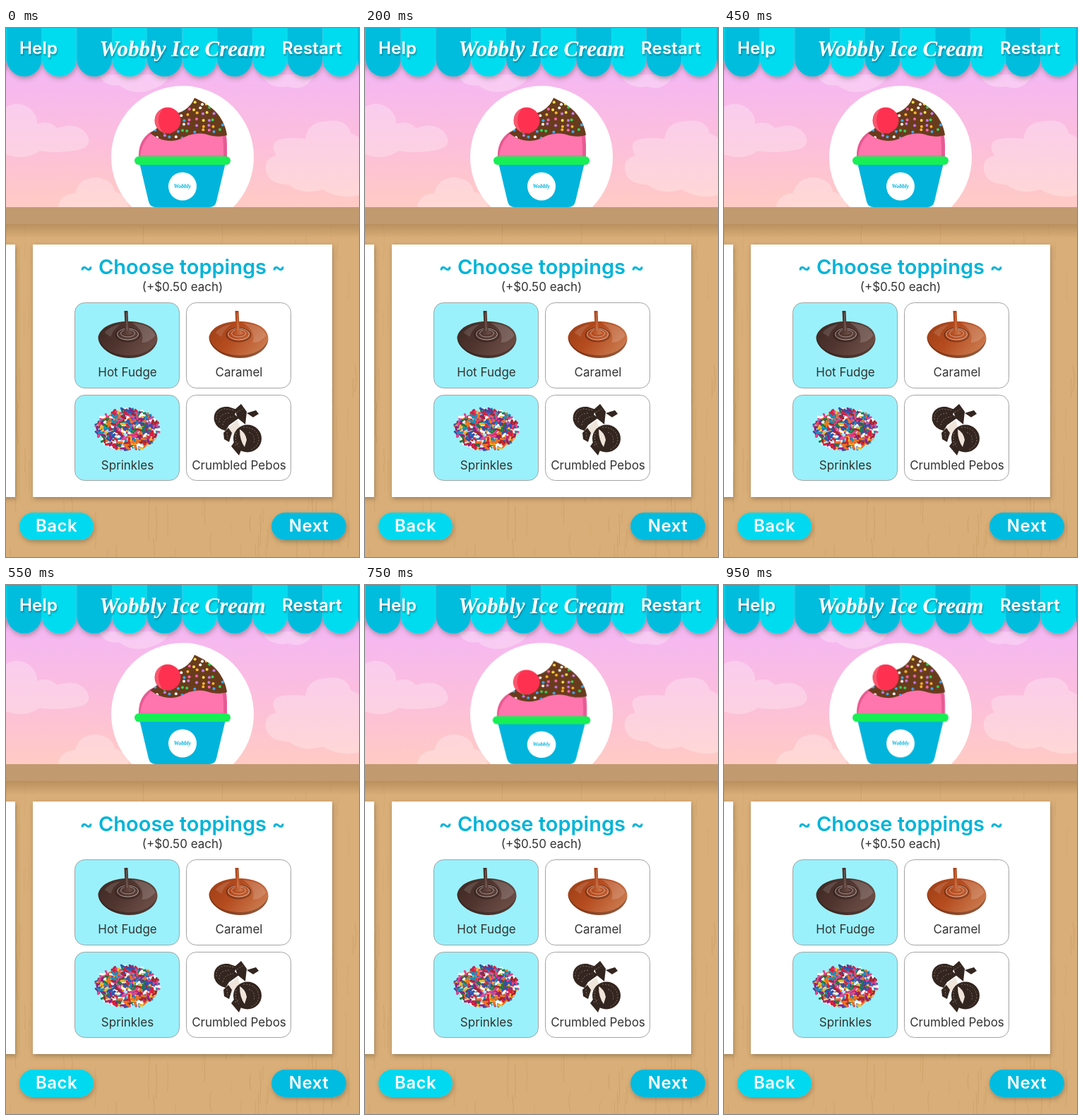
An HTML page that plays this animation: 500x750 px, repeating every 1 s.

```html
<!DOCTYPE html>
<html lang="en">
<head>
<meta charset="utf-8">
<title>Wobbly Ice Cream</title>
<style>
html, body { margin: 0; width: 100%; height: 100%; overflow: hidden; background: #d9ae78; }
svg { display: block; width: 100%; height: 100%; }
text { font-family: Inter, Roboto, sans-serif; }
.nav { font-size: 24px; font-weight: 600; letter-spacing: .2px; fill: #fff; filter: url(#textShadow); }
.brand { font: italic bold 31px "Liberation Serif", serif; fill: #fff; text-anchor: middle; filter: url(#textShadow); }
.heading { font-size: 29px; font-weight: 600; fill: #00b4d8; text-anchor: middle; }
.label { font-size: 17px; fill: #333; text-anchor: middle; }
.button { font-size: 24px; font-weight: 600; letter-spacing: .5px; fill: #fff; text-anchor: middle; }
.tag { font: italic bold 8px "Liberation Serif", serif; fill: #00b4dc; text-anchor: middle; }
.card { fill: #fff; stroke: #a3a3a3; }
.on { fill: #9af1fb; }
.sundae { transform-origin: 250px 254px; animation: wobble 1s infinite; }
@keyframes wobble {
  0%, 60% { transform: none; animation-timing-function: steps(1); }
  65% { transform: scale(.985, 1.003); animation-timing-function: steps(2); }
  75% { transform: scale(1.018, .945); animation-timing-function: steps(2); }
  85% { transform: scale(.993, 1.008); animation-timing-function: steps(2); }
  95%, 100% { transform: none; }
}
</style>
</head>
<body>
<svg viewBox="0 0 500 750" preserveAspectRatio="none">
  <defs>
    <linearGradient id="sky" x2="0" y2="1">
      <stop offset=".25" stop-color="#f5b7f3"/>
      <stop offset=".65" stop-color="#fcbfdb"/>
      <stop offset="1" stop-color="#ffcbc4"/>
    </linearGradient>
    <linearGradient id="shade" x2="0" y2="1">
      <stop stop-color="#805a30" stop-opacity=".36"/>
      <stop offset="1" stop-color="#805a30" stop-opacity="0"/>
    </linearGradient>
    <linearGradient id="fudge" x2="1" y2=".5">
      <stop stop-color="#3d2722"/>
      <stop offset=".5" stop-color="#50352f"/>
      <stop offset="1" stop-color="#6b4d45"/>
    </linearGradient>
    <linearGradient id="caramel" x2="1" y2=".5">
      <stop stop-color="#9c3d15"/>
      <stop offset=".5" stop-color="#b54c1f"/>
      <stop offset="1" stop-color="#c9774b"/>
    </linearGradient>
    <filter id="textShadow" x="-10%" y="-20%" width="120%" height="150%">
      <feDropShadow dx="1" dy="2" stdDeviation="1" flood-color="#045" flood-opacity=".5"/>
    </filter>
    <filter id="drop" x="-10%" y="-10%" width="120%" height="140%">
      <feDropShadow dx="1" dy="3" stdDeviation="3" flood-color="#543" flood-opacity=".4"/>
    </filter>
    <clipPath id="window"><rect width="500" height="254"/></clipPath>
    <path id="sauce" d="M204 149C215 144 228 124 240 121C254 119 263 109 267 99C278 104 291 111 300 122C308 132 312 143 313 152C302 155 294 154 285 151C268 147 258 152 248 157C234 163 218 160 204 149Z"/>
    <clipPath id="sauceClip"><use href="#sauce"/></clipPath>
    <g id="pour">
      <path d="M-42 37C-39 22-19 14 4 15C27 16 42 25 42 40C41 55 23 67 2 67C-21 67-42 53-42 37Z"/>
      <path d="M-42 37C-38 54-20 63 2 63C23 63 38 53 42 40C41 56 23 67 2 67C-21 67-42 53-42 37Z" fill="#000" opacity=".28"/>
      <path d="M6 17Q33 19 39 35Q31 45 20 45Q25 29 6 17Z" fill="#fff" opacity=".16"/>
      <path d="M-33 31Q-25 21-10 19Q-22 27-24 37Z" fill="#fff" opacity=".13"/>
      <g fill="none" stroke="#fff">
        <ellipse cy="34" rx="17" ry="9.500" stroke="#000" opacity=".3" stroke-width="2"/>
        <ellipse cy="33" rx="15" ry="8" opacity=".5"/>
        <ellipse cy="32" rx="10" ry="5" opacity=".45"/>
      </g>
      <path d="M-5 0H0L1 22Q2 29 7 32Q-1 36-9 32Q-4 29-4 22Z"/>
      <path d="M-2 3L-1 28" stroke="#fff" opacity=".25"/>
    </g>
  </defs>

  <g clip-path="url(#window)">
    <rect width="500" height="254" fill="url(#sky)"/>
    <g fill="#fff" opacity=".27">
      <path d="M0 112Q18 102 34 114Q45 124 44 136Q62 130 72 142Q101 132 114 150Q126 170 96 174Q64 178 48 174Q27 189 0 179Z"/>
      <path d="M74 254Q76 236 98 234Q104 211 129 212Q151 215 154 232Q171 236 174 254Z"/>
      <path d="M132 66Q139 84 160 81Q180 97 207 87Q231 78 230 66Z"/>
      <path d="M368 202Q366 184 383 181Q371 161 391 157Q409 155 424 157Q427 133 454 132Q483 128 488 149L500 155V237Q475 244 448 229Q421 238 400 222Q371 221 368 202Z"/>
      <path d="M362 66Q372 87 399 83Q425 91 437 66Z"/>
    </g>
    <circle cx="250" cy="183" r="101" fill="#fff"/>
    <g class="sundae">
      <path d="M188 184C187 164 196 151 210 145L306 135Q313 148 313 166V184Z" fill="#e75b92"/>
      <path d="M190 184C191 165 201 151 214 146L302 135Q309 150 308 184Z" fill="#ff75ad"/>
      <use href="#sauce" fill="#693b1d"/>
      <g id="dots" clip-path="url(#sauceClip)"></g>
      <circle cx="229" cy="131" r="18.500" fill="#ff3151"/>
      <path d="M222 114A18.500 18.500 0 0 0 222 148Q210 131 222 114Z" fill="#f7596f"/>
      <path d="M189 191H311L298 246Q296 254 288 254H212Q204 254 202 246Z" fill="#00b4dc"/>
      <rect x="182" y="182" width="136" height="12" rx="6" fill="#17ef55"/>
      <circle cx="250" cy="224.500" r="20" fill="#fff"/>
      <text class="tag" x="250" y="227">Wobbly</text>
    </g>
  </g>

  <rect y="254" width="500" height="496" fill="#d9ae78"/>
  <g id="grain" fill="none" stroke="#b98a50" opacity=".32"></g>
  <rect y="278" width="500" height="20" fill="url(#shade)"/>
  <rect y="254" width="500" height="24" fill="#c29a70"/>

  <g id="awning" filter="url(#drop)"></g>
  <text class="nav" x="19" y="37">Help</text>
  <text class="brand" x="250" y="40">Wobbly Ice Cream</text>
  <text class="nav" x="391" y="37">Restart</text>

  <g fill="#fff" filter="url(#drop)">
    <rect x="-30" y="307" width="43" height="358"/>
    <rect x="38" y="307" width="424" height="358"/>
  </g>
  <text class="heading" x="250" y="349">~ Choose toppings ~</text>
  <text class="label" x="250" y="373">(+$0.50 each)</text>

  <rect class="card on" x="97.500" y="389.500" width="148" height="121" rx="14"/>
  <rect class="card" x="255.500" y="389.500" width="148" height="121" rx="14"/>
  <rect class="card on" x="97.500" y="520.500" width="148" height="121" rx="14"/>
  <rect class="card" x="255.500" y="520.500" width="148" height="121" rx="14"/>
  <use href="#pour" x="172.500" y="401" fill="url(#fudge)"/>
  <use href="#pour" x="329.500" y="401" fill="url(#caramel)"/>
  <g id="pile" stroke-width="3" stroke-linecap="round"></g>

  <g fill="#33251f">
    <path d="M309 571L328 556L331 565L318 580Z" fill="#efe5da"/>
    <path d="M295 557C293 543 302 536 315 537L327 541L324 548L330 553L316 563L311 571Q298 568 295 557Z"/>
    <path d="M324 541L333 533L341 544L339 562L328 553Z"/>
    <path d="M341 546L354 542L358 547L350 552Z"/>
    <path d="M308 574L315 567L320 574L316 587L309 583Z"/>
    <ellipse cx="342" cy="582" rx="20" ry="19.500"/>
    <path d="M331 569Q339 573 341 584L338 594Q331 585 331 569Z" fill="#efe5da"/>
    <path d="M319 593L329 579L335 594L330 606Z"/>
    <g fill="none" stroke="#806e63" stroke-dasharray="2 2">
      <path d="M298 555Q297 543 309 540L324 542M302 559Q301 546 318 546M307 563Q309 552 322 551M327 545L335 540M313 573L314 582M324 592L331 587"/>
      <path d="M336 566Q357 566 358 584Q357 593 347 598M344 573Q354 577 351 589M326 574Q323 587 330 594"/>
    </g>
  </g>

  <text class="label" x="172" y="494">Hot Fudge</text>
  <text class="label" x="330" y="494">Caramel</text>
  <text class="label" x="172" y="626">Sprinkles</text>
  <text class="label" x="330" y="626">Crumbled Pebos</text>

  <g filter="url(#drop)">
    <rect x="19" y="687" width="105" height="39" rx="19.500" fill="#00d9ef"/>
    <rect x="376" y="687" width="106" height="39" rx="19.500" fill="#00bce0"/>
  </g>
  <text class="button" x="71.500" y="714">Back</text>
  <text class="button" x="429" y="714">Next</text>
</svg>
<script>
let seed = 7;
const rand = () => (seed = seed * 16807 % 2147483647) / 2147483647;
const between = (a, b) => a + rand() * (b - a);
const pick = list => list[Math.floor(rand() * list.length)];

function add(id, tag, attrs) {
  const node = document.createElementNS("http://www.w3.org/2000/svg", tag);
  for (const key in attrs) node.setAttribute(key, attrs[key]);
  document.getElementById(id).append(node);
}

// Awning scallops
for (let i = -1; i < 11; i++) {
  const x = i * 49.7 + 1;
  add("awning", "path", {
    d: `M${x} -9V44A24.85 24.85 0 0 0 ${x + 49.7} 44V-9Z`,
    fill: i % 2 ? "#00dcef" : "#00bddd"
  });
}

// Wood grain
for (let i = 0; i < 190; i++) {
  const x = between(0, 500), y = between(275, 740), h = between(15, 60), bend = between(-4, 4);
  add("grain", "path", { d: `M${x} ${y}q${bend} ${h / 2} 0 ${h}`, "stroke-width": between(.4, 1.2) });
}

// Dots on the scoop, spaced on a jittered grid
const dotColors = ["#fff", "#ffb52e", "#35d353", "#3fa9f5", "#ff65b4", "#ffe14d", "#c47bf0"];
for (let y = 106; y < 158; y += 8) {
  for (let x = 214; x < 311; x += 9) {
    add("dots", "circle", {
      cx: x + between(-3, 3), cy: y + between(-2.5, 2.5), r: 2, fill: pick(dotColors)
    });
  }
}

// Heap of sprinkles
const pileColors = ["#d8213b", "#fff", "#ee7420", "#217a40", "#3152b0", "#eebb2b", "#8f2083", "#e0458f", "#1d8fb8", "#a3252d"];
for (let i = 0; i < 520; i++) {
  const turn = between(0, Math.PI * 2), far = Math.sqrt(rand());
  const x = 171.5 + Math.cos(turn) * far * 44, y = 569 + Math.sin(turn) * far * 29;
  const tilt = between(0, Math.PI), dx = Math.cos(tilt) * 2.8, dy = Math.sin(tilt) * 2.3;
  add("pile", "line", { x1: x - dx, y1: y - dy, x2: x + dx, y2: y + dy, stroke: pick(pileColors) });
}
</script>
</body>
</html>
```
